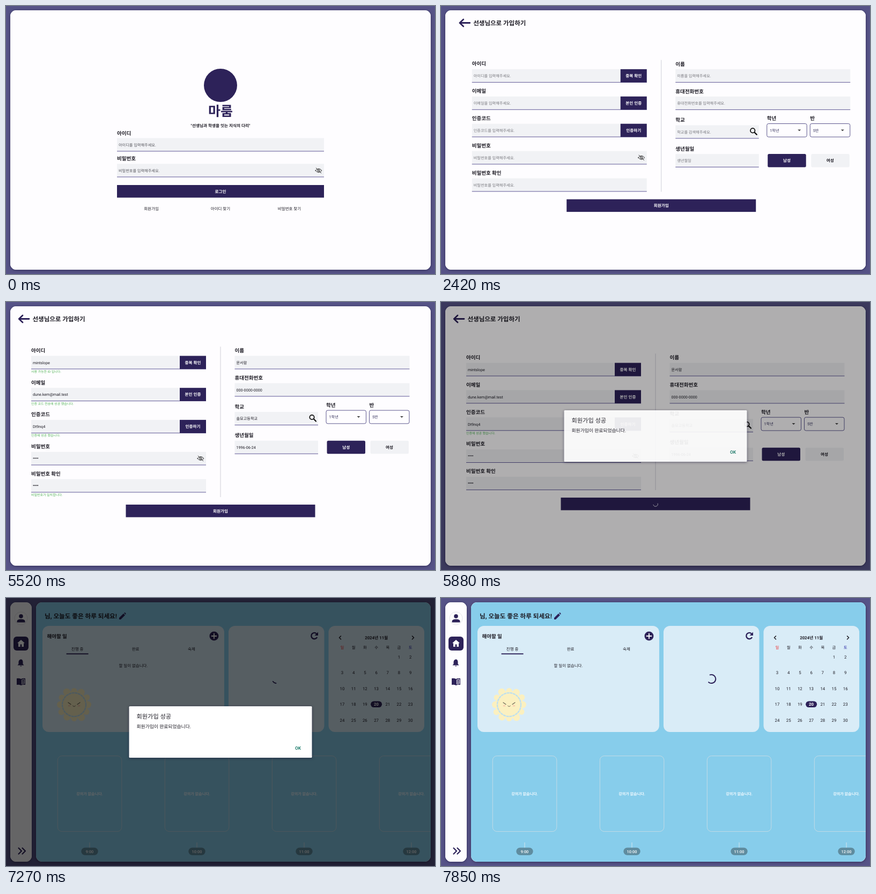
An HTML page for the animation above (7.88 s loop, 800x500 px).

```html
<!DOCTYPE html>
<html lang="ko">
<head>
<meta charset="utf-8">
<title>Sign-up flow</title>
<style>
  html, body { margin: 0; width: 100%; height: 100%; overflow: hidden; background: #565387; }
  svg { display: block; width: 100vw; height: 100vh; }
  text { font-family: Roboto, 'Noto Sans CJK KR', 'Noto Sans CJK', sans-serif; text-rendering: geometricPrecision; white-space: pre; }
  .shade { filter: drop-shadow(0 1px 2.5px rgba(20, 15, 50, .55)); }
  .line { fill: none; stroke-linecap: round; stroke-linejoin: round; }
</style>
</head>
<body>
<svg viewBox="0 0 800 500" id="stage"></svg>
<script>
const LOOP = 7880, NAVY = '#2d2259', INK = '#1d1b24', PAPER = '#fefdff', FIELD = '#f1f2f5';
const $ = id => document.getElementById(id);
const clamp = v => Math.max(0, Math.min(1, v));
const ramp = (t, a, b) => clamp((t - a) / (b - a));
const rep = (n, fn) => Array.from({ length: n }, (_, i) => fn(i)).join('');

const text = (x, y, size, str, o = {}) =>
  `<text x="${x}" y="${y + size * .37}" font-size="${size}" fill="${o.fill || INK}" font-weight="${o.w || 400}" text-anchor="${o.a || 'start'}">${str}</text>`;
const mid = (x, y, size, str, o = {}) => text(x, y, size, str, { ...o, a: 'middle' });
const rect = (x, y, w, h, fill, r = 0, extra = '') =>
  `<rect x="${x}" y="${y}" width="${w}" height="${h}" rx="${r}" fill="${fill}" ${extra}/>`;
const dot = (x, y, r, fill) => `<circle cx="${x}" cy="${y}" r="${r}" fill="${fill}"/>`;
const oval = (x, y, rx, ry, fill) => `<ellipse cx="${x}" cy="${y}" rx="${rx}" ry="${ry}" fill="${fill}"/>`;
const shape = (d, fill) => `<path d="${d}" fill="${fill}"/>`;
const line = (d, stroke = NAVY, w = 1) => `<path class="line" d="${d}" stroke="${stroke}" stroke-width="${w}"/>`;
const at = (x, y, body) => `<g transform="translate(${x} ${y})">${body}</g>`;
const sheet = rect(8, 8, 784, 484, PAPER);
const button = (x, y, w, label, h = 23.5, r = 0) =>
  rect(x, y, w, h, NAVY, r) + mid(x + w / 2, y + h / 2, 7.6, label, { fill: '#fff', w: 700 });
const field = (x, y, w, value, fill = INK) =>
  rect(x, y, w, 24.5, FIELD) + rect(x, y + 24, w, .9, '#4f478c') + text(x + 3, y + 12.5, 7.2, value, { fill });
const label = (x, y, str) => text(x, y, 9.5, str, { w: 700 });
const eyeOff = (x, y) => at(x, y,
  line('M-6 0Q0-7 6 0Q0 7-6 0ZM-4.8-4.8L4.8 4.8', '#333', 1) + `<circle r="2.2" fill="none" stroke="#333"/>`);
const header = title => line('M43 31.5H25M31 25l-6.8 6.5 6.8 6.5', NAVY, 2.8) + text(49.5, 32, 11.5, title, { w: 700 });

function login() {
  const hint = '#55555c';
  return sheet + dot(400, 148, 31, NAVY) +
    mid(400, 196, 25, '마룸', { fill: NAVY, w: 900 }) +
    mid(400, 223.5, 7.65, '"선생님과 학생을 잇는 지식의 다리"', { w: 700 }) +
    label(207, 237, '아이디') + field(207, 246.5, 386, '아이디를 입력해주세요.', hint) +
    label(207, 284.5, '비밀번호') + field(207, 294.5, 386, '비밀번호를 입력해주세요.', hint) + eyeOff(583, 307) +
    button(207, 334, 386, '로그인') +
    `<g id="joinLink">${mid(271, 378, 7.5, '회원가입')}</g>` +
    mid(400, 378, 7.5, '아이디 찾기') + mid(528.5, 378, 7.5, '비밀번호 찾기');
}

function teacherArt() {
  const soft = '#e2e2e4', dark = '#2f2e41', coat = '#3f3d56', skin = '#ffb8b8';
  const frame = (x, y, w, h) => rect(x, y, w, h, '#fdfdfd', 3, `stroke="${soft}" stroke-width="1.6"`);
  const pill = (x, y) => rect(x, y, 28.5, 9.4, NAVY, 4.7);
  return rect(119.5, 141.5, 153.5, 126, '#fdfdfd', 4, `stroke="${soft}" stroke-width="4"`) +
    shape('M273 206Q270 242 234 251Q220 255 207 268H269Q273 268 273 264Z', '#dedee0') +
    frame(141, 171, 30, 22) + frame(214.5, 177, 30, 17) + shape('M226 181l9 4.500-9 4.500z', '#d5d5d8') +
    rect(219, 197, 22, 4, soft, 2) + rep(6, i => rect(141, 202 + i * 4, 31, 1.4, '#d5d5d8')) +
    line('M177 195L208 187M200 182l9 5-6 6M181 212L201 219M196 211l6 8-9 2', soft, 1) +
    `<circle cx="215" cy="237" r="9" fill="#fdfdfd" stroke="${soft}" stroke-width="2.4"/>` + line('M211 237l4 4 6-9', soft, 2) +
    line('M257 126.500H230V178M105 241H155.500V211M238 278H214.500V248', '#66656e', 1) +
    dot(229.5, 178.5, 4.5, NAVY) + dot(155.5, 211.5, 4.5, NAVY) + dot(214.5, 248, 4.5, NAVY) +
    pill(256.5, 121.7) + pill(76.3, 236.7) + pill(237.5, 273.2) +
    line('M249.500 322.300H349', '#cfcfd3', 1) + shape('M319 321Q322 306 336 307Q336 320 319 321Z', '#ececee') +
    line('M311 220Q326 215 336 217Q343 222 337 229Q324 234 312 232M327 222l5 4', '#dcdce0', 2) +
    line('M252 186L246 181', skin, 4) + rect(283, 309, 5, 11, skin) + rect(307, 309, 5, 11, skin) +
    shape('M280 246L277 312H287L294.500 268L304 312H313.500L308.500 246Z', dark) +
    shape('M277 321.500Q280 316 289 317V321.500ZM304 317Q312 316 313.500 321.500H303Z', dark) +
    shape('M289 192L284 204L256 187L251 191Q258 203 266 204L284 212Q280 232 281 249Q291 253 307 249L320 226Q318 203 312 199L301 192Z', coat) +
    shape('M294 225Q301 217 314 221L317 236Q307 244 296 240Q291 235 294 225Z', '#f3f3f6') +
    line('M317 222L307 246', coat, 6) + dot(308, 243, 3.2, skin) +
    oval(295, 184.5, 6.6, 7, skin) + shape('M287.500 184Q287 174 295 174Q304 174 303.500 184Q299 179 287.500 184Z', dark);
}

function studentArt() {
  const dark = '#2f2e41', skin = '#ffb8b8', brown = '#a0616a';
  const page = 'M490 150Q530 136 573 151V240Q531 229 490 250Z';
  const leaf = x => shape(`M${x} 300Q${x - 3} 284 ${x + 6} 276Q${x + 12} 290 ${x + 5} 300Z`, '#ededef');
  return shape('M490 245Q530 230 573 244Q615 232 656 246V255Q615 240 573 250Q530 238 490 254Z', '#cfcfd2') +
    shape(page, '#e3e3e5') + `<g transform="matrix(-1 0 0 1 1146 0)">${shape(page, '#e3e3e5')}</g>` +
    line('M573 151V242', '#cfcfd2', 1) +
    rep(5, i => line(`M498 ${159 + i * 10}Q530 ${147 + i * 10} 564 ${159 + i * 10}`, '#fbfbfc', 2.6)) +
    line('M581 160Q615 148 648 159V204Q615 195 581 206Z', '#fbfbfc', 2.2) +
    line('M581 222Q614 212 647 223', NAVY, 2.6) +
    line('M448.500 301H569M610 301H730.500', '#cfcfd3', 1) + leaf(461) + leaf(705) +
    // left student
    line('M497 215L498 245M515 215L524 237', brown, 4.6) + line('M523.500 232V247', NAVY, 4) +
    shape('M497 236L484 294L493 296L508 256L512 296H521L520 236Z', dark) +
    shape('M482 300.500Q484 294 495 299V300.500ZM511 300.500V295Q520 293 525 300.500Z', dark) +
    shape('M498 207Q506 202 515 209L518 222L519 237H498L494 220Z', '#c9c9cd') +
    oval(504, 201, 5, 6, brown) + oval(504, 198, 7.2, 6.5, dark) + dot(494, 192, 5.5, dark) +
    // right student
    line('M682 222L684 244', skin, 4.5) + line('M676 219L664 219L651 207', skin, 4) +
    line('M660 193.500L650.500 213', NAVY, 6.5) + shape('M647 211L646 223L654 214Z', NAVY) +
    shape('M667 234H688L697 293H679L676 262L668 295H650Z', dark) +
    shape('M653 300.500Q657 295 666 297V300.500ZM682 296Q692 293 697 300.500H682Z', dark) +
    shape('M672 211Q680 205 686 212V225L688 236H666L667 223Z', '#c9c9cd') +
    oval(675, 198, 5.500, 7, skin) + shape('M668 195Q669 188 678 189Q687 191 684 201Q681 207 677 203Q677 197 668 195Z', dark) +
    shape('M682 191Q691 184 692 197Q690 213 694 226Q682 217 686 198Z', dark);
}

const choice = () => sheet + header('회원가입') + rect(399.4, 92, 1, 315, '#d3d3da') +
  at(-1, 0, teacherArt() + studentArt()) +
  `<g id="teacherBtn">${button(32, 378, 359, '선생님으로 가입하기')}</g>` + button(409, 378, 359, '학생으로 가입하기');

// Column height depends on how many confirmation notes are shown.
function form({ filled, notes, btn = '', busy }) {
  const lift = (4 - notes.filter(Boolean).length) * 4.35, top = 90.3 + lift, end = 378 - lift;
  const hint = '#77777d', dots = rep(4, i => dot(51.4 + i * 2.6, 0, .95, INK));
  const put = (x, y, w, value, empty) => field(x, y, w, filled ? value : empty, filled ? INK : hint);
  const rows = [
    ['아이디', 'mintslope', '아이디를 입력해주세요.', '중복 확인'],
    ['이메일', 'dune.kem@mail.test', '이메일을 입력해주세요.', '본인 인증'],
    ['인증코드', 'Dt9nq4', '인증코드를 입력해주세요.', '인증하기'],
    ['비밀번호', '', '비밀번호를 입력해주세요.'],
    ['비밀번호 확인', '', '비밀번호를 입력해주세요.']];
  let y = top;
  const left = rows.map(([name, value, empty, action], i) => {
    const note = notes[i];
    const out = label(47, y, name) + put(47, y + 10.2, 326, value, empty) +
      (action ? button(324, y + 10.2, 49, action, 24.7) : filled ? at(0, y + 22, dots) : '') +
      (i === 3 ? eyeOff(363, y + 22.5) : '') +
      (note ? text(47, y + 39.5, 6, note, { fill: '#52b356' }) : '');
    y += note ? 59.7 : 50.9;
    return out;
  }).join('');
  const select = (x, name, value) => label(x, 101.8, name) +
    rect(x, 111.8, 74.5, 24.8, PAPER, 3, 'stroke="#4b4482" stroke-width=".9"') +
    text(x + 5.5, 124.2, 7.2, value, { fill: '#33305a' }) + shape(`M${x + 57.5} 122.700h6l-3 3z`, '#444');
  const right = at(0, top, label(426.5, .3, '이름') + put(426.5, 10.2, 326, '문서람', '이름을 입력해주세요.') +
    label(426.5, 51.3, '휴대전화번호') + put(426.5, 61.2, 326, '000-0000-0000', '휴대전화번호를 입력해주세요.') +
    label(426.5, 104.8, '학교') + put(426.5, 114.8, 155.5, '솔묘고등학교', '학교를 검색해주세요.') +
    `<circle cx="570.5" cy="124.7" r="4.2" fill="none" stroke="#111" stroke-width="1.8"/>` + line('M573.800 128L578 132.200', '#111', 2.2) +
    select(597, '학년', '1학년') + select(677.5, '반', '5반') +
    label(426.5, 158.4, '생년월일') + put(426.5, 168.4, 155.5, '1996-06-24', '생년월일') +
    button(598.5, 168.4, 71.5, '남성', 24.6, 2.5) + rect(679.5, 168.4, 71.5, 24.6, FIELD, 2.5) +
    mid(715, 180.7, 7.6, '여성', { w: 700 }));
  return sheet + header('선생님으로 가입하기') + left + right +
    rect(399.5, top - 7, 1, end - top - 7, '#cfcfd8') +
    `<g id="${btn}">${button(223.5, end, 353, busy ? '' : '회원가입')}</g>`;
}

function sun() {
  const cream = '#fbf0c0';
  return rep(12, i => {
    const a = i * Math.PI / 6, r = 25.5 + (i % 3);
    return dot(r * Math.cos(a), r * Math.sin(a), 6.5 - i % 2, cream);
  }) + dot(0, 0, 26, cream) +
    '<circle r="22" fill="none" stroke="#bfe0ee" stroke-width="2.4" stroke-dasharray="5 .8"/>' +
    line('M-11-4l5 3.500M11-4l-5 3.500', '#6b6455', 1.2) + line('M-2.500 2Q0 5 2.500 2', '#6b6455', 1) +
    oval(-9, 2, 2.5, 1.5, '#f8cdb0') + oval(9, 2, 2.5, 1.5, '#f8cdb0');
}

function cards(W) {
  const unit = W - 40, side = unit * .2565, wide = unit - side * 2, x2 = 20 + wide, x3 = x2 + side + 8;
  return { wide, side, x2, x3 };
}

function home(W) {
  const { wide, side, x2, x3 } = cards(W);
  const panel = (x, w, body) => at(x, 52, rect(0, 0, w, 198, '#d9ecf7', 12) + body);
  const todo = text(8.5, 19, 9.5, '해야할 일', { w: 700 }) +
    dot(wide - 19, 19, 8.5, NAVY) + line(`M${wide - 23.5} 19h9M${wide - 19} 14.500v9`, '#fff', 1.8) +
    ['진행 중', '완료', '숙제'].map((s, i) => mid(wide * [.192, .512, .82][i], 43.6, 7.5, s, { w: 500 })).join('') +
    rect(wide * .192 - 20.5, 51.3, 41, 1.9, NAVY) +
    mid(wide / 2, 74, 7.5, '할 일이 없습니다.') + at(59, 147, sun());
  const reload = at(side - 18.5, 18.5, line('M4.600 3.500A5.700 5.700 0 1 1 4-4', NAVY, 2.4) + shape('M7-7V-.500H.500Z', NAVY));
  const col = i => 25.5 + i * (side - 51.3) / 6;
  const days = rep(30, n => {
    const cell = n + 5, x = col(cell % 7), y = 57.8 + Math.floor(cell / 7) * 29.5, today = n === 19;
    return (today ? rect(x - 10.5, y - 5.8, 21, 11.6, NAVY, 5.8) : '') +
      mid(x, y, 7.8, n + 1, today ? { fill: '#fff', w: 700 } : {});
  });
  const calendar = line(`M23 19l-3 3 3 3M${side - 22.5} 19l3 3-3 3`, INK, 1.6) +
    mid(side / 2, 22.2, 7.8, '2024년 11월', { w: 700 }) +
    [...'일월화수목금토'].map((d, i) => mid(col(i), 40.5, 7.4, d, { fill: i === 0 ? '#f02a2a' : i === 6 ? '#2b2aa5' : INK })).join('') + days;
  const lessons = rep(4, i => at(40 + i * 200, 0,
    rect(.3, 294.6, 119.5, 141, 'none', 8, 'stroke="#c2dbe6" stroke-width="1"') +
    mid(60, 365.5, 7.1, '강의가 없습니다.', { fill: '#f5fbff', w: 700 }) +
    rect(59.5, 456, 1, 11, '#d6e6ee') + rect(44.3, 465.7, 31.4, 14, '#5f8c9f', 7) +
    mid(60, 472.8, 7.4, `${9 + i}:00`, { fill: '#fff', w: 500 })));
  return rect(0, 8, W, 484, '#87cdeb', 11) +
    text(16, 33.5, 11.6, '님, 오늘도 좋은 하루 되세요!', { w: 700 }) +
    at(161, 34, shape('M-6 6V3L2-5L5-2L-3 6ZM3-6L4.500-7Q7-6 6.500-4L6-3Z', NAVY)) +
    panel(12, wide, todo) + panel(x2, side, reload) + panel(x3, side, calendar) + lessons;
}

const sidebar = () => rect(8, 8, 40, 484, PAPER) +
  '<circle cx="28" cy="38" r="12" fill="#fff" stroke="#e4e4ea"/>' + dot(28, 34, 3.8, NAVY) +
  shape('M20.500 45.500V43Q21 39.500 28 39.500T35.500 43V45.500Z', NAVY) +
  rect(14, 72, 28, 26, NAVY, 6) + shape('M28 78l7 6.300h-2V91h-3.600v-4.500h-2.800V91H23v-6.700h-2z', '#fff') +
  shape('M21.500 125.500l2-2.500v-4Q24 115 27.500 114.500T31.500 119v4l2 2.500ZM26 126.500h3.500q-1.700 2.500-3.500 0z', NAVY) +
  shape('M20 150q4-1 8 1q4-2 8-1v12q-4-1-8 1q-4-2-8-1z', NAVY) +
  line('M30 152.500q2-1 4.300-.700v8q-2.300-.300-4.300.700z', '#fff', 1) + line('M30.500 155h3M30.500 157.500h3', '#fff', .8);

const dialog = () => rect(229.5, 202, 341, 96, '#fff', 1.5, 'class="shade"') +
  text(243.5, 220.5, 11.2, '회원가입 성공', { w: 500 }) +
  text(243.5, 240, 8.8, '회원가입이 완료되었습니다.') +
  mid(544.5, 280, 8.4, 'OK', { fill: '#238070', w: 700 }) +
  '<circle id="ripple" cx="543" cy="280.500" r="6" fill="#cfe9f2"/>';

const allNotes = ['사용 가능한 ID 입니다.', '인증 코드 전송에 성공 했습니다.', '인증에 성공 했습니다.', '', '비밀번호가 일치합니다.'];
$('stage').innerHTML = `
  <defs>
    <clipPath id="mainClip"><rect id="mainBox" y="8" height="484" rx="11"/></clipPath>
    <clipPath id="sideClip"><rect id="sideBox" x="8" y="8" height="484" rx="11"/></clipPath>
  </defs>
  ${rect(0, 0, 800, 500, '#565387')}
  <rect id="mainShade" class="shade" y="8" height="484" rx="11" fill="${PAPER}"/>
  <rect id="sideShade" class="shade" x="8" y="8" height="484" rx="11" fill="${PAPER}"/>
  <g clip-path="url(#mainClip)">
    <g id="login">${login()}</g>
    <g id="choice">${choice()}</g>
    <g id="blank">${form({ notes: [] })}</g>
    <g id="filled">${form({ filled: true, notes: allNotes, btn: 'submitBtn' })}</g>
    <g id="sent">${form({ filled: true, notes: ['', '', allNotes[2]], busy: true })}
      <path id="sentSpin" class="line" stroke="#e8e8f2" stroke-width="1"/></g>
    <g id="home"><g id="homeBody"></g><path id="homeSpin" class="line" stroke="${NAVY}" stroke-width="2"/></g>
  </g>
  <g id="side" clip-path="url(#sideClip)">${sidebar()}<g id="chevrons">${line('M-6-5.500l5.500 5.500-5.500 5.500M1-5.500l5.500 5.500-5.500 5.500', NAVY, 2.2)}</g></g>
  <rect id="dim" width="800" height="500"/>
  <g id="dialog">${dialog()}</g>`;

const set = (id, attrs) => { for (const k in attrs) $(id).setAttribute(k, attrs[k]); };
const show = (id, on) => set(id, { display: on ? 'inline' : 'none' });
const move = (id, x) => set(id, { transform: `translate(${x} 0)` });

// Critically damped spring, from 1 down to 0.
const spring = (t, start) => {
  const u = Math.max(0, t - start) * .025;
  return Math.exp(-u) * (1 + u);
};
const press = (id, t, start) => set(id, { opacity: 1 - .6 * ramp(t, start, start + 100) });

// Indeterminate ring: the head runs out, the tail follows, the whole ring turns.
function ring(cx, cy, r, t, start, angle) {
  const ease = x => 1 - (1 - x ** 1.6) ** 3;
  const turns = (t - start) / 1333, f = turns - Math.floor(turns);
  const head = .75 * ease(Math.min(1, f * 2)), tail = .75 * ease(Math.max(0, f * 2 - 1));
  const a = angle + .162 * (t - start) + 360 * (.25 * f + tail), sweep = 360 * (head - tail) + 25;
  const point = deg => `${cx + r * Math.cos(deg * Math.PI / 180)} ${cy + r * Math.sin(deg * Math.PI / 180)}`;
  return `M${point(a)}A${r} ${r} 0 ${sweep > 180 ? 1 : 0} 1 ${point(a + sweep)}`;
}

let builtWidth = 0;
function draw(t) {
  show('login', t < 1700);
  show('choice', t >= 1110 && t < 2750);
  show('blank', t >= 2170 && t < 4000);
  show('filled', t >= 3760 && t < 5610);
  show('sent', t >= 5610 && t < 6700);
  show('home', t >= 5880);
  press('joinLink', t, 1000);
  press('teacherBtn', t, 2060);
  press('submitBtn', t, 5520);
  move('choice', t < 1610 ? 784 * spring(t, 1110) : 0);
  move('blank', t < 2670 ? 784 * spring(t, 2170) : 0);
  set('filled', { opacity: ramp(t, 3745, 3960) });
  set('sentSpin', { d: ring(400, 377, 4.3, t, 5610, -75) });

  const k = ramp(t, 5880, 6300), open = k < .5 ? 2 * k * k : 1 - 2 * (1 - k) ** 2;
  const left = 8 + 48 * open, W = 792 - left, sideW = Math.max(0, left - 16);
  for (const id of ['mainBox', 'mainShade']) set(id, { x: left, width: W });
  for (const id of ['sideBox', 'sideShade']) set(id, { width: sideW });
  show('side', sideW > 0);
  show('sideShade', sideW > 0);
  set('chevrons', { transform: `translate(${9.5 + sideW / 2} 472) rotate(${-360 * (1 - open)})` });
  if (t >= 5880) {
    if (W !== builtWidth) $('homeBody').innerHTML = home(builtWidth = W);
    move('home', left + (t < 6330 ? W * spring(t, 5880) : 0));
    const { x2, side } = cards(W);
    set('homeSpin', { d: ring(x2 + side / 2, 151, 8, t, 6140, -51) });
  }

  set('dim', { opacity: .6 * (ramp(t, 5790, 5965) - ramp(t, 7345, 7575)) });
  set('dialog', { opacity: ramp(t, 5785, 5890) - ramp(t, 7370, 7500) });
  set('ripple', { opacity: .9 * ramp(t, 7300, 7420) });
}

const origin = performance.now();
function tick() {
  draw((performance.now() - origin) % LOOP);
  requestAnimationFrame(tick);
}
tick();
</script>
</body>
</html>
```
